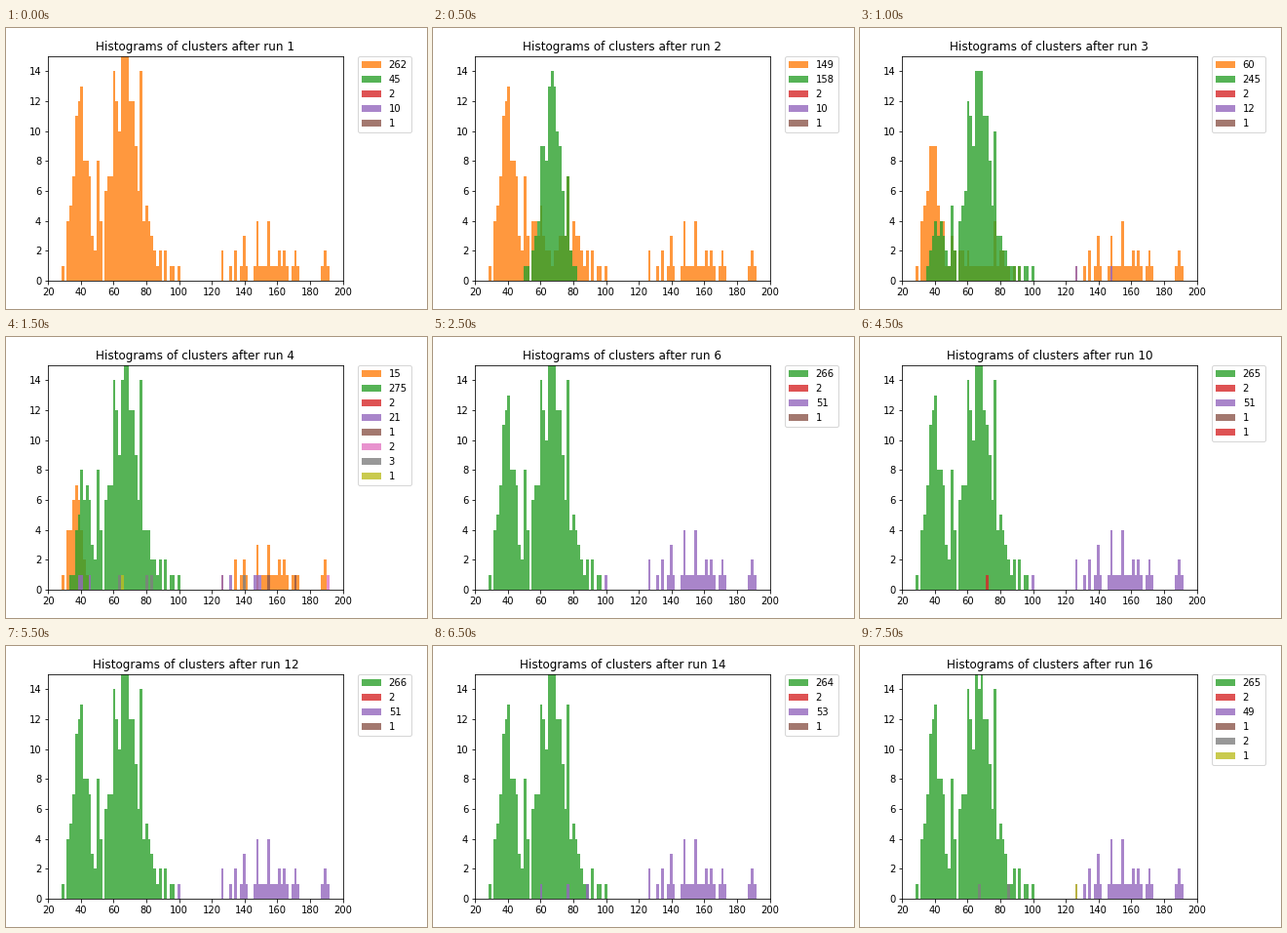
Write a matplotlib script that moves like this. It is 432 by 288 pixels and loops after 8 s.

```python
import numpy as np
import matplotlib.pyplot as plt
from matplotlib.animation import FuncAnimation
from matplotlib.patches import Patch

plt.rcParams["text.kerning_factor"] = 6

ORANGE, GREEN, RED, PURPLE, BROWN, PINK, GRAY, OLIVE = range(1, 9)
ALPHA = 0.8
K = np.arange(109)
WIDTH = 180 / len(K)
EDGES = 19.92 + WIDTH * K

# corner points of the dense group, and lone bars around it
SKYLINE = [(7, 4), (8, 5), (9, 7), (10, 11), (12, 13), (13, 8), (15, 7),
           (16, 3), (17, 2), (18, 8), (20, 0), (21, 6), (23, 7), (24, 14),
           (26, 10), (27, 15), (29, 15), (30, 12), (31, 12), (33, 6),
           (34, 14), (35, 4), (36, 5), (40, 1)]
LONE = {5: 1, 41: 2, 43: 2, 45: 1, 46: 1, 48: 1, 64: 2, 67: 1, 69: 2}
PEAKS = {72: 3, 77: 4, 81: 4, 85: 2, 87: 2, 91: 2, 102: 2}


def histogram():
    h = np.floor(np.interp(K, *zip(*SKYLINE), left=0, right=0) + 0.5)
    for k, n in PEAKS.items():
        h[k - 1:k + n // 2 + 1] = 1
    for k, n in (LONE | PEAKS).items():
        h[k] = n
    return h


TOTAL = histogram()


def split(share, rest, strays):
    """Green takes its share of each bin; strays take single items."""
    green = np.rint(TOTAL * share)
    bars = {GREEN: green, rest: TOTAL - green}
    for cid, where in strays.items():
        bars.setdefault(cid, np.zeros(len(K)))
        for k in where:
            owner = max(GREEN, rest, key=lambda c: bars[c][k])
            bars[owner][k] -= 1
            bars[cid][k] += 1
    return bars


def growing(counts, share, strays={}):
    return dict(enumerate(counts, ORANGE)), split(share, ORANGE, strays)


def settled(strays={}, edge=48):
    """Green left of the edge bin, purple from there on."""
    counts = {GREEN: 218 + edge, RED: 2, PURPLE: 99 - edge, BROWN: 1}
    for cid, where in strays.items():
        for k in where:
            counts[GREEN if k < edge else PURPLE] -= 1
            counts[cid] = counts.get(cid, 0) + 1
    return counts, split(K < edge, PURPLE, strays)


early = 0.9 * np.exp(-((K - 28) / 7.5) ** 2)
late = 1 / (1 + np.exp((11 - K) / 1.5)) * (K < 60)

RUNS = [
    growing((262, 45, 2, 10, 1), 0 * K),
    growing((149, 158, 2, 10, 1), early),
    growing((60, 245, 2, 12, 1), (early + late) / 2, {PURPLE: (64, 77)}),
    growing((15, 275, 2, 21, 1, 2, 3, 1), late,
            {PURPLE: (11, 12, 15, 64, 67, 76, 77, 78), BROWN: (81, 91),
             PINK: (103,), GRAY: (26, 36, 38, 72), OLIVE: (27,)}),
    settled({ORANGE: (8, 10), GRAY: (36,)}),
    settled(),
    settled(),
    settled({PINK: (28,)}),
    settled({OLIVE: (24, 34)}),
    settled({RED + 10: (31,)}),
    settled({PINK + 10: (22,)}),
    settled(),
    settled({PURPLE: (34, 41)}, edge=49),
    settled({PURPLE: (24, 34, 41)}, edge=49),
    settled({GRAY: (11, 28, 39), OLIVE: (64,)}, edge=49),
    settled({GRAY: (28, 39), OLIVE: (64,)}, edge=49),
]

fig = plt.figure(figsize=(6, 4), dpi=72, facecolor="white")
ax = fig.add_axes([0.1, 0.1, 0.7, 0.8])


def draw(i):
    counts, bars = RUNS[i]
    ax.clear()
    handles = []
    for cid in sorted(counts):
        style = dict(color=f"C{cid}", alpha=ALPHA, linewidth=0)
        handles.append(Patch(label=str(counts[cid]), **style))
        if cid in bars:
            k = np.flatnonzero(bars[cid])
            ax.bar(EDGES[k], bars[cid][k], WIDTH, align="edge", **style)
    ax.set(xlim=(20, 200), ylim=(0, 15),
           xticks=range(20, 201, 20), yticks=range(0, 15, 2))
    ax.set_title(f"Histograms of clusters after run {i + 1}")
    ax.legend(handles=handles, bbox_to_anchor=(1.05, 1), loc="upper left",
              borderaxespad=0)
    return []


anim = FuncAnimation(fig, draw, frames=len(RUNS), init_func=lambda: [],
                     interval=500, repeat=True, repeat_delay=0, blit=False)
plt.show()
```
